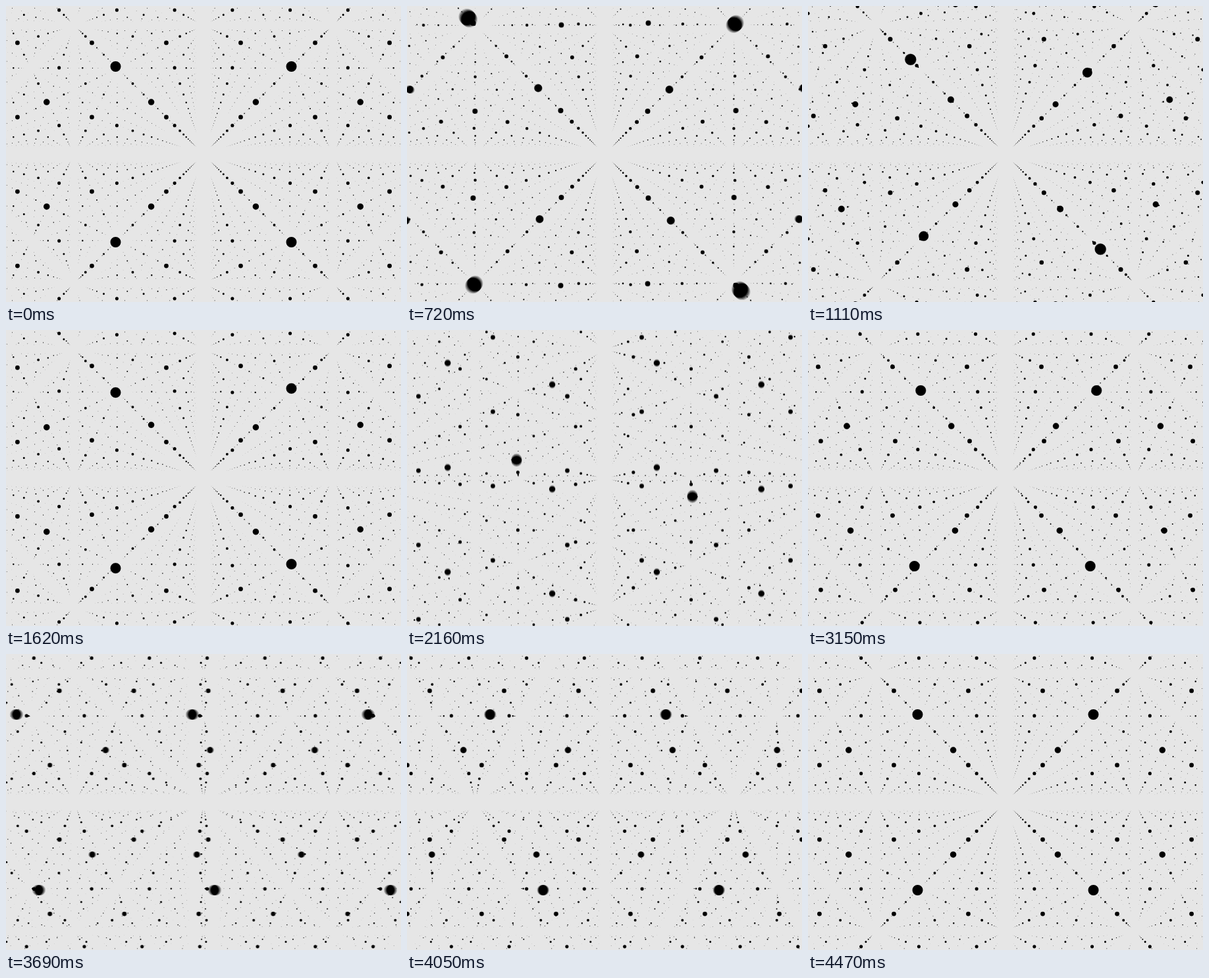
Recreate the animation shown at these times as an HTML page with a canvas. Size 600 by 450 pixels, loop 4.5 s.

```html
<!DOCTYPE html>
<html lang="en">
<head>
<meta charset="utf-8">
<title>Lattice</title>
<style>
  html, body { margin: 0; width: 100%; height: 100%; overflow: hidden; background: #e6e6e6; }
  canvas { display: block; }
</style>
</head>
<body>
<canvas id="stage" width="600" height="450"></canvas>
<script>
const ctx = document.getElementById('stage').getContext('2d');
const W = 600, H = 450, CX = 300, CY = 225.5;
const FOCAL = 392, NEAR = 0.936, RADIUS = 0.06;
const STEP = 30, LOOP = 4500, PHASE = 1500;
const SAMPLES = 5, SHUTTER = 0.5, POWER = 2.2, LAYERS = 19;

const ease = p => p < 0.5
  ? 0.5 * (2 * p) ** POWER
  : 1 - 0.5 * (2 - 2 * p) ** POWER;

// Dots shrink away towards the far plane.
const fade = z => Math.max(0, Math.min(1, (38 - z) / 30));

// +1 for even sums of cell indices, -1 for odd ones.
const sign = sum => sum & 1 ? -1 : 1;

function dot(x, y, r) {
  if (x < -r || x > W + r || y < -r || y > H + r) return;
  if (r < 0.5) {
    const a = r * Math.sqrt(Math.PI);
    ctx.rect(x - a / 2, y - a / 2, a, a);
  } else {
    ctx.moveTo(x + r, y);
    ctx.arc(x, y, r, 0, 2 * Math.PI);
  }
}

// Neighbouring lines of the lattice slide one cell in opposite directions,
// along z, then y, then x.
function drawLayer(k, axis, shift) {
  const z0 = NEAR + 2 * k;
  const reach = z0 + (axis === 0 ? shift : 0);
  const nx = Math.ceil(reach * 320 / FOCAL / 2) + 1;
  const ny = Math.ceil(reach * 245 / FOCAL / 2) + 1;
  ctx.beginPath();
  for (let j = -ny - 1; j <= ny; j++) {
    for (let i = -nx - 1; i <= nx; i++) {
      let x = 2 * i + 1, y = 2 * j + 1, z = z0;
      if (axis === 0) z += shift * sign(i + j);
      else if (axis === 1) y += shift * sign(i + k);
      else x += shift * sign(j + k);
      if (z < 0.5) continue;
      const s = FOCAL / z, r = RADIUS * s * fade(z);
      if (r > 0.05) dot(CX + x * s, CY + y * s, r);
    }
  }
  ctx.fill();
}

function draw(time) {
  const axis = Math.floor(time / PHASE);
  const local = time - axis * PHASE;
  ctx.clearRect(0, 0, W, H);
  // Additive alpha averages the samples into motion blur.
  ctx.globalCompositeOperation = 'lighter';
  ctx.fillStyle = `rgba(0,0,0,${1 / SAMPLES})`;
  for (let n = 0; n < SAMPLES; n++) {
    const offset = 0.5 + SHUTTER * ((n + 0.5) / SAMPLES - 0.5);
    const shift = 2 * ease((local + offset * STEP) / PHASE);
    for (let k = -1; k <= LAYERS; k++) drawLayer(k, axis, shift);
  }
}

const start = performance.now();
let last = -1;

function tick() {
  const elapsed = performance.now() - start + 1;
  const step = Math.floor((elapsed % LOOP) / STEP);
  if (step !== last) {
    last = step;
    draw(step * STEP);
  }
  requestAnimationFrame(tick);
}
tick();
</script>
</body>
</html>
```
